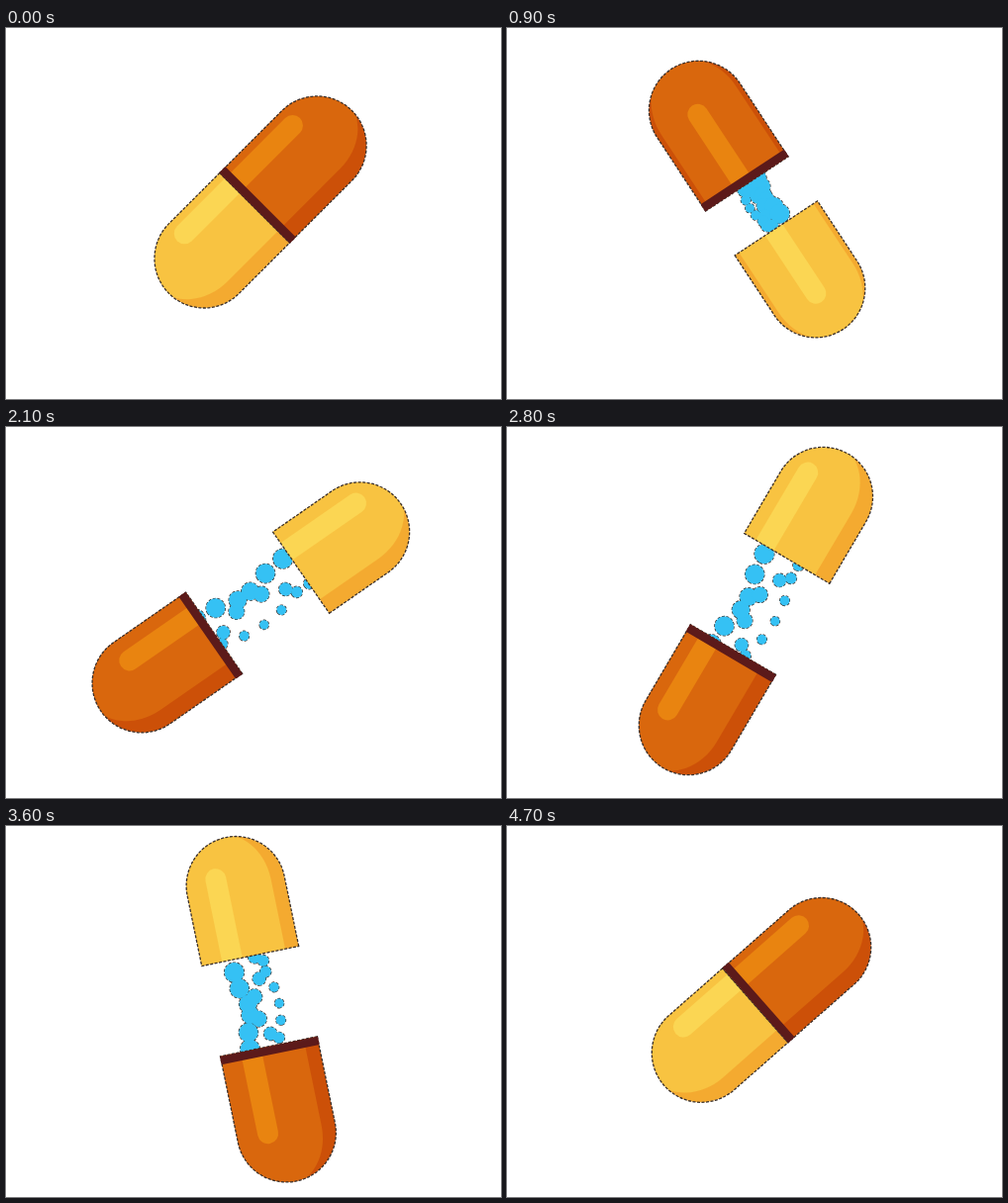
An HTML page with a canvas that plays this animation: 500x375 px, repeating every 4800 ms.

```html
<!DOCTYPE html>
<html lang="en">
<head>
<meta charset="utf-8">
<title>Capsule</title>
<style>
html, body { margin: 0; width: 100%; height: 100%; overflow: hidden; background: #fff; }
canvas { display: block; }
</style>
</head>
<body>
<canvas id="stage" width="500" height="375"></canvas>
<script>
const ctx = document.getElementById('stage').getContext('2d');
const { PI, sin, cos, exp, min } = Math;
const LOOP = 4800, STEP = 100, R = 50, GRAINS = 17;

const ORANGE = { body: '#d9670d', shade: '#cc5008', shine: '#e98410', length: 89, band: '#5c1a1a' };
const YELLOW = { body: '#f8c341', shade: '#f4aa30', shine: '#fbd653', length: 72.5 };

// One turn per loop, fast while opening and closing, slow in between.
function turnAt(phase) {
  const swing = 20.9 * sin(phase) - 16.1 * sin(2 * phase) - 10.1 * sin(3 * phase) + 2.4 * sin(5 * phase);
  return phase + swing * PI / 180;
}

// 0 when closed, 1 when fully apart; closing mirrors opening.
function openAt(t) {
  return 1 / (1 + exp((898 - min(t, LOOP - t)) / 158));
}

function fill(color) {
  ctx.fillStyle = color;
  ctx.fill();
}

function outline() {
  ctx.strokeStyle = '#3a302c';
  ctx.lineWidth = 1.3;
  ctx.setLineDash([3, 1.5]);
  ctx.stroke();
}

function dome(length, rx, ry, y) {
  ctx.beginPath();
  ctx.moveTo(-length, y - ry);
  ctx.lineTo(0, y - ry);
  ctx.ellipse(0, y, rx, ry, 0, -PI / 2, PI / 2);
  ctx.lineTo(-length, y + ry);
  ctx.closePath();
}

// Draws a half whose round end points along +x (side 1) or -x (side -1).
// The light slides across it as the capsule opens.
function half(look, x, side, open, tip) {
  ctx.save();
  ctx.translate(x, 0);
  ctx.scale(side, 1);
  dome(look.length, R, R, 0);
  fill(look.shade);
  ctx.save();
  ctx.clip();
  dome(look.length, 54, 45, -12 + 24 * open);
  fill(look.body);
  ctx.translate(tip, 0);
  dome(look.length + tip, 10.5, 10.5, -32 + 58 * open);
  fill(look.shine);
  ctx.restore();
  dome(look.length, R, R, 0);
  outline();
  if (look.band) {
    ctx.fillStyle = look.band;
    ctx.fillRect(-look.length, -R - .5, 8.5, 2 * R + 1);
  }
  ctx.restore();
}

// A wavy row of grains that stretches with the gap; larger ones lie on the lit side.
function grains(phase, open) {
  const stretch = open * (.85 + .4 * sin(phase / 2) ** 2);
  // All outlines go under all fills so touching grains merge.
  for (const paint of [outline, () => fill('#35c1f4')]) {
    for (let i = 0; i < GRAINS; i++) {
      const y = 22 * cos(2 * PI * i / 2.8);
      ctx.beginPath();
      ctx.arc((48 - 6.2 * i) * stretch, y * open, 7.3 + .12 * y, 0, 2 * PI);
      paint();
    }
  }
}

function draw(t) {
  const phase = 2 * PI * t / LOOP;
  const open = openAt(t);
  const reach = (161 + 107.5 * open) / 2;
  const shift = 5 + 1.7 * open;
  ctx.clearRect(0, 0, 500, 375);
  ctx.save();
  ctx.translate(253.5, 179.5);
  ctx.rotate(-PI / 4 - turnAt(phase));
  ctx.translate(0, 3 * sin(phase));
  grains(phase, open);
  half(YELLOW, shift - reach, -1, open, -4 + 17 * open);
  half(ORANGE, shift + reach, 1, open, -3);
  ctx.restore();
}

const start = performance.now();
function tick() {
  const t = (performance.now() - start) % LOOP;
  draw(Math.floor(t / STEP) * STEP);
  requestAnimationFrame(tick);
}
tick();
</script>
</body>
</html>
```
